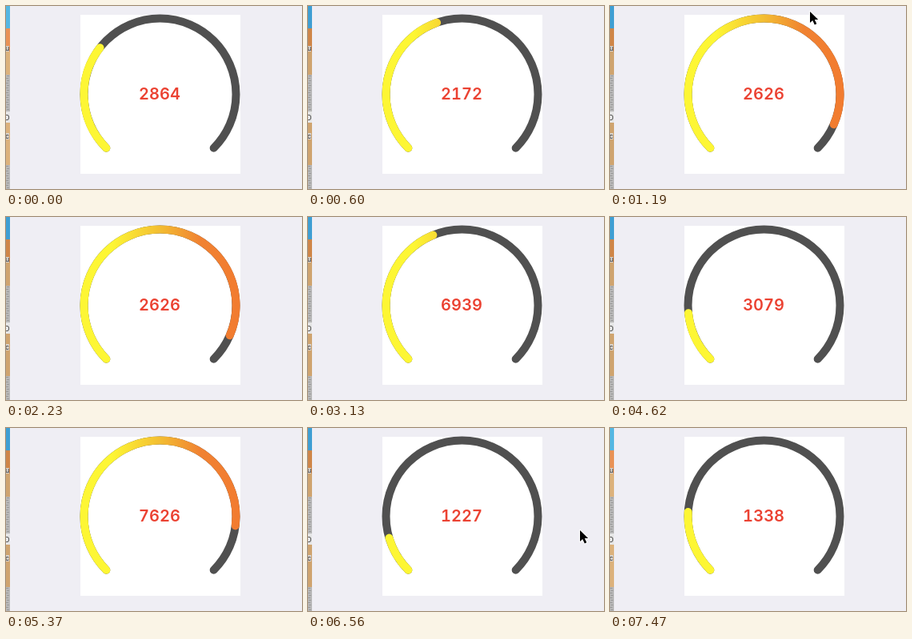
An HTML page with a canvas that plays this animation: 370 by 229 pixels, repeating every 7500 ms.

```html
<!DOCTYPE html>
<html lang="en">
<head>
<meta charset="utf-8">
<title>Gauge</title>
<style>
  html, body { margin: 0; width: 100%; height: 100%; overflow: hidden; background: #efeef4; }
  canvas { position: absolute; left: 0; top: 0; width: 370px; height: 229px; }
  #value {
    position: absolute; left: 92px; top: 10px; width: 200px; height: 200px;
    font: 600 20px/201px Inter, sans-serif; font-feature-settings: "tnum";
    text-align: center; color: #eb4232;
  }
</style>
</head>
<body>
<canvas id="stage"></canvas>
<div id="value"></div>
<script>
const W = 370, H = 229, LOOP = 7500, TICK = 148.6;
const CX = 192.5, CY = 110.5, RADIUS = 95;
const START = Math.PI * 0.75, SWEEP = Math.PI * 1.5;

// Each run restarts the gauge; lead is the progress already made at its first tick.
const runs = [
  { at: 0, value: 2864, fill: 0.307, lead: 1 },
  { at: 150, value: 2626, fill: 0.92, lead: 0.02 },
  { at: 2830, value: 8902, fill: 1, lead: 0.12 },
  { at: 4330, value: 7626, fill: 0.86, lead: 0.02 },
  { at: 5970, value: 1338, fill: 0.179, lead: 0.1426 }
];

// Pointer stops: from, until, x, y
const pointerStops = [
  [1190, 1340, 250, 7], [1340, 1490, 320, 87],
  [1490, 1630, 332, 194], [1630, 1780, 331, 218],
  [6560, 6710, 340, 128], [6710, 6860, 337, 170], [6860, 7000, 334, 207]
];

const canvas = document.getElementById("stage");
const label = document.getElementById("value");
const ctx = canvas.getContext("2d");
const ratio = window.devicePixelRatio || 1;
canvas.width = W * ratio;
canvas.height = H * ratio;
ctx.scale(ratio, ratio);

const paint = ctx.createLinearGradient(92, 0, 293, 0);
paint.addColorStop(0.2, "#fdf634");
paint.addColorStop(0.5, "#f3bd32");
paint.addColorStop(0.75, "#f08232");
paint.addColorStop(1, "#f27b2f");

function rect(x, y, w, h, color) {
  ctx.fillStyle = color;
  ctx.fillRect(x, y, w, h);
}

function arc(fraction, color) {
  ctx.beginPath();
  ctx.arc(CX, CY, RADIUS, START, START + SWEEP * fraction);
  ctx.lineWidth = 10;
  ctx.lineCap = "round";
  ctx.strokeStyle = color;
  ctx.stroke();
}

function grain(top, bottom) {
  rect(0, top, 5, bottom - top, "#b9b9b9");
  for (let y = top + 1; y < bottom; y += 3) rect(y % 2, y, 3, 1, "#999");
}

function drawStrip(bright) {
  const tan = bright ? "#dcb27c" : "#cfa46f";
  rect(0, 0, 5, 28, bright ? "#55b7e2" : "#3f9fd3");
  rect(0, 28, 5, 29, bright ? "#e99256" : "#cf8648");
  rect(0, 57, 5, 29, tan);
  grain(86, 132);
  rect(0, 132, 5, 14, "#e6e6e6");
  rect(0, 146, 5, 53, tan);
  grain(199, H);
  rect(0, 50, 4, 7, "#d8d2cb");
  rect(0, 159, 4, 8, "#d8d2cb");
  ctx.fillStyle = "#333";
  ctx.font = "9px Inter, sans-serif";
  ctx.save();
  ctx.beginPath();
  ctx.rect(0, 0, 5, H);
  ctx.clip();
  ctx.fillText("u", -1, 56);
  ctx.fillText("D", -2, 143);
  ctx.fillText("c", -1, 166);
  ctx.restore();
}

function drawPointer(x, y) {
  ctx.save();
  ctx.translate(x, y);
  const shape = new Path2D("M0 0V14L3.2 11L5.8 16.4L8.3 15.3L5.8 10H10.2Z");
  ctx.lineJoin = "round";
  ctx.lineWidth = 2;
  ctx.strokeStyle = "#fff";
  ctx.stroke(shape);
  ctx.fillStyle = "#000";
  ctx.fill(shape);
  ctx.restore();
}

function draw(t) {
  const run = runs.filter(r => r.at <= t).pop();
  const tick = Math.floor((t - run.at + 2) / TICK);
  const progress = Math.min(1, run.lead + tick * TICK / 1000);
  const eased = 1 - Math.pow(1 - progress, 2.8);

  rect(0, 0, W, H, "#efeef4");
  drawStrip(t < 150 || t >= 7470);
  rect(93, 11, 200, 199, "#fff");
  arc(1, "#505050");
  arc(run.fill * progress, paint);
  label.textContent = Math.round(run.value * eased);

  const stop = pointerStops.find(([from, until]) => t >= from && t < until);
  if (stop) drawPointer(stop[2], stop[3]);
}

const origin = performance.now();
function loop() {
  draw((performance.now() - origin) % LOOP);
  requestAnimationFrame(loop);
}
loop();
</script>
</body>
</html>
```
